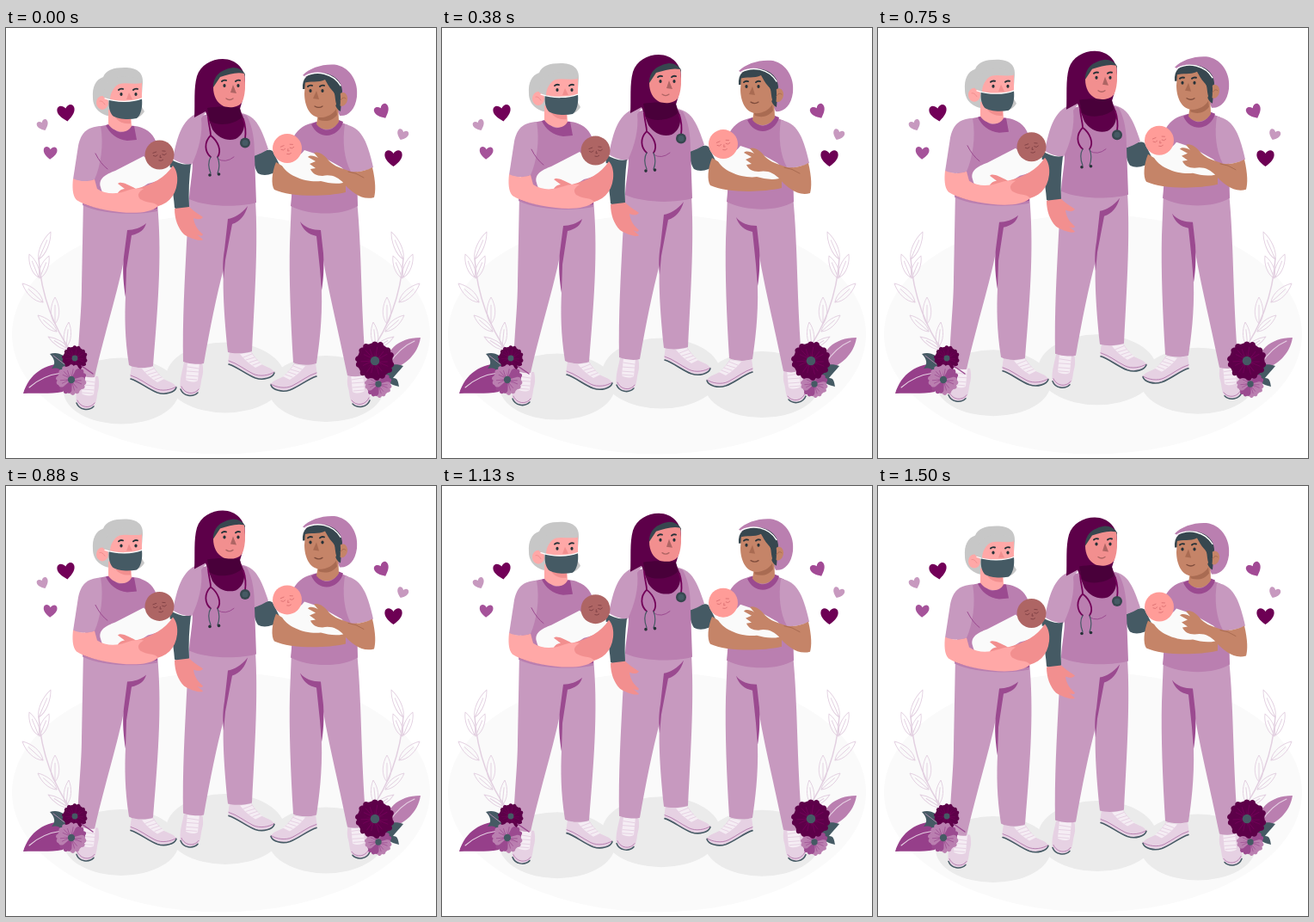
Recreate the animation shown at these times as an HTML page with a canvas. Size 500 by 500 pixels, loop 1.54 s.

```html
<!DOCTYPE html>
<html lang="en">
<head>
<meta charset="utf-8">
<title>Nurses</title>
<style>
html, body { margin: 0; width: 100%; height: 100%; overflow: hidden; background: #fff; }
canvas { display: block; width: 500px; height: 500px; }
</style>
</head>
<body>
<canvas id="stage" width="500" height="500"></canvas>
<script>
const ctx = document.getElementById('stage').getContext('2d');
const LOOP = 1540, STEPS = 37, RISE = 10;
const C = {
  plum: '#5d0049', plumDeep: '#49003a', heart: '#720058', mid: '#9b4a90', shirt: '#ba7fb0', pale: '#c799bf',
  teal: '#455a64', ink: '#37474f', dark: '#263238', skin: '#ffa8a7', blush: '#f28f8f',
  tan: '#c58468', tanDark: '#a96b52', brown: '#ae6564', pink: '#ff9c98', cloth: '#fafafa', hair: '#c7c7c7',
  shoe: '#e6d1e3', lace: '#f5edf4', twig: '#e2cfe0'
};

function fill(color, d) {
  ctx.fillStyle = color;
  ctx.fill(new Path2D(d));
}
function line(color, width, d) {
  ctx.strokeStyle = color;
  ctx.lineWidth = width;
  ctx.stroke(new Path2D(d));
}
function oval(color, x, y, rx, ry = rx, turn = 0) {
  ctx.fillStyle = color;
  ctx.beginPath();
  ctx.ellipse(x, y, rx, ry, turn, 0, Math.PI * 2);
  ctx.fill();
}
function at(x, y, turn, scaleX, scaleY, draw) {
  ctx.save();
  ctx.translate(x, y);
  ctx.rotate(turn);
  ctx.scale(scaleX, scaleY);
  draw();
  ctx.restore();
}

function heart(color, x, y, width, turn) {
  at(x, y, turn, width / 20, width / 20, () =>
    fill(color, 'M0 10C-7 5-11 0-10-5C-9-10-3-10 0-5C3-10 9-10 10-5C11 0 7 5 0 10Z'));
}

function sprigLeaf(x, y, tipX, tipY, width) {
  const len = Math.hypot(tipX - x, tipY - y);
  at(x, y, Math.atan2(tipY - y, tipX - x), 1, 1, () =>
    line(C.twig, .9, `M0 0C${len * .25} ${-width} ${len * .7} ${-width * .8} ${len} 0` +
      `C${len * .7} ${width * .8} ${len * .25} ${width} 0 0L${len * .7} 0`));
}
function sprig() {
  line(C.twig, 1.5, 'M75 375C57 350 41 313 38 268');
  const leaves = [[38, 269, 52, 237, 6], [38, 290, 27, 263, 6], [39, 291, 50, 265, 6], [43, 319, 19, 297, 7],
    [57, 344, 57, 313, 7], [59, 353, 37, 334, 6], [70, 371, 73, 342, 6], [73, 374, 49, 359, 5]];
  for (const leaf of leaves) sprigLeaf(...leaf);
}

function flower(x, y, r, colors, veins) {
  const petals = 7;
  for (let i = 0; i < petals; i++) {
    at(x, y, i * Math.PI * 2 / petals - 1.4, r / 20, r / 20, () => {
      fill(colors[i % colors.length], 'M0 0L9-7C12-10 16-9 17-6C20-5 20-2 18 0C21 2 20 5 17 6C16 9 12 10 9 7Z');
      line(veins, .8, 'M4 0L14 0M5 1L12 4M5-1L12-4');
    });
  }
  oval(C.teal, x, y, r * .23);
}

function sideShoe(x, y, flip = 1) {
  at(x, y, 0, flip, 1, () => {
    fill(C.shoe, 'M1 0C0 7-1 11 0 15L31 31C40 33 51 31 53 25C51 19 43 18 38 15C33 10 29 5 26 0C18 3 8 3 1 0Z');
    fill(C.lace, 'M13 3L26 1C29 6 34 12 39 15L31 19C23 14 18 9 13 3Z');
    line(C.mid, .6, 'M0 11C10 14 18 21 28 26C36 30 47 28 53 24');
    line(C.shoe, 1, 'M17 7L27 3M20 10L30 7M24 13L33 10M28 16L36 13');
    line(C.teal, 1.6, 'M0 15C10 18 20 27 31 31C40 34 51 31 53 25');
  });
}
function frontShoe(x, y, flip = 1) {
  at(x, y, 0, flip, 1, () => {
    fill(C.shoe, 'M4 0C2 10-2 22 0 31C3 39 14 41 20 35C24 29 23 24 25 17C27 10 26 4 25 0Z');
    fill(C.lace, 'M8 0L22 0L20 21C15 24 9 22 6 20Z');
    line(C.mid, .6, 'M1 28C5 37 16 38 21 31');
    line(C.shoe, 1, 'M8 5L21 7M7 10L21 11M7 15L20 16M6 19L19 20');
    line(C.teal, 1.5, 'M0 31C3 39 14 41 20 35');
  });
}

function eyes(left, right, y) {
  for (const x of [left, right]) {
    oval(C.dark, x, y, 1.6, 2);
    line(C.dark, 1.9, `M${x - 3} ${y - 5}Q${x - 1} ${y - 7} ${x + 2} ${y - 6}`);
  }
}
function baby(x, y, skin, features, turn) {
  oval(skin, x, y, 17);
  at(x, y, turn, .8, .8, () =>
    line(features, 1, 'M-9 0Q-6 3-3 0M4 0Q7 3 10 0M-9-4L-4-5M5-5L9-4M1 1L0 4L2 4M-2 8Q1 10 4 8'));
}

function backdrop() {
  ctx.fillStyle = '#fff';
  ctx.fillRect(0, 0, 500, 500);
  oval('#fafafa', 250, 356, 243, 139.5);
  sprig();
  at(500, 0, 0, -1, 1, sprig);
  heart(C.heart, 70, 98.5, 20, -.15);
  heart(C.pale, 43, 113, 13, -.4);
  heart('#a5539a', 51.5, 145, 15.5, .05);
  heart('#a24a95', 437.5, 97, 17, -.45);
  heart(C.pale, 461, 124, 13, .35);
  heart('#6d0054', 450.5, 151, 20, 0);
}

function shadows() {
  oval('#ebebeb', 134, 422, 67, 38.5);
  oval('#ebebeb', 255, 406.5, 69, 41);
  oval('#ebebeb', 372, 419.5, 67, 38.5);
}

function middleNurse() {
  frontShoe(203, 389);
  sideShoe(259, 376);
  fill(C.pale, 'M213 198C235 206 270 206 290 200C293 250 290 300 286 376C278 379 264 379 258 377C253 330 252 300 253 280C245 310 237 350 230 390C222 392 211 390 206 388C205 340 208 290 210 250Z');
  fill(C.mid, 'M281 207C274 216 265 221 258 222L254 258C252 270 252 278 253 292L255 270L263 228C272 225 278 218 281 207Z');
  fill(C.teal, 'M288 149C296 145 304 139 310 143L320 163C310 171 300 173 293 169C289 163 288 156 288 149Z');
  fill(C.pale, 'M274 99C291 102 297 117 305 141C300 144 294 147 288 149Z');
  fill(C.shirt, 'M222 104C235 98 270 97 280 102C287 115 289 130 289 148L291 203C270 209 232 208 213 199C214 180 219 160 216 150Z');
  fill(C.pale, 'M234 96C208 100 201 117 194 152C200 156 208 159 216 159C224 142 229 123 227 105Z');
  fill(C.teal, 'M191 152C198 157 208 160 215 158C213 174 212 190 213 208C207 212 200 212 196 209C195 190 189 170 191 152Z');
  fill(C.blush, 'M196 210L213 208C218 213 225 217 229 220C225 224 222 222 218 221C219 229 223 235 229 240C228 243 224 241 222 240L229 246C226 249 213 244 207 240C200 233 196 222 196 210Z');
  line(C.mid, 1, 'M246 152Q255 158 265 150');
  // scarf and face
  fill(C.plum, 'M219 104C220 88 218 70 222 56C226 43 239 36 252 36C268 36 279 48 278 64C277 76 275 85 272 94L277 107C278 119 274 125 267 129C257 132 247 128 240 118L232 97Z');
  fill(C.plumDeep, 'M234 93C245 91 258 91 272 93L274 104C266 112 247 115 237 108Z');
  fill(C.ink, 'M241 70C240 56 250 48 264 46C270 46 276 49 278 54L275 66Z');
  fill(C.blush, 'M241 69L249 57C259 54 268 51 277 53C279 68 278 80 274 87C269 93 259 93 253 91C245 87 241 79 241 69Z');
  eyes(254, 270, 67);
  fill(C.brown, 'M264 66L261 75L268 76Z');
  line(C.brown, 1.3, 'M256 82Q260 85 264 82');
  // stethoscope
  line(C.heart, 1.8, 'M235 104C236 115 238 119 238 125C230 133 231 144 238 150M238 125C247 132 251 143 246 150M276 106C279 115 279 122 278 129');
  line(C.teal, 1.2, 'M238 150C234 157 236 164 238 169M246 150C249 158 248 164 246 169');
  oval(C.dark, 237, 171, 1.8);
  oval(C.dark, 247.5, 170, 1.8);
  oval(C.ink, 278, 133.5, 6);
  oval(C.teal, 278, 133.5, 3.5);
}

function leftNurse() {
  frontShoe(82, 405);
  sideShoe(145, 393);
  fill(C.pale, 'M90 198L176 204C181 260 178 310 171 393C164 396 150 396 143 392C138 360 138 335 139 312L137 270C130 306 116 350 103 406C96 407 89 405 83 402C84 360 88 330 88 300Z');
  fill(C.mid, 'M163 227C158 232 148 235 141 235L137 266C135 283 137 300 139 313L140 280L146 241C155 239 161 235 163 227Z');
  fill(C.shirt, 'M107 115C116 111 150 112 158 116C169 120 174 128 177 140L176 213C150 218 112 217 89 206L93 170Z');
  fill(C.mid, 'M90 201C120 212 155 213 176 207L176 210C150 216 115 214 89 204Z');
  fill(C.pale, 'M110 114C94 115 87 122 84 137L78 176C85 179 94 179 103 176C110 160 114 136 110 114Z');
  line(C.mid, 1, 'M104 146Q110 158 118 164');
  // head
  fill(C.hair, 'M124 103C111 102 101 94 101 81C100 69 104 60 113 57C116 49 125 46 138 46C151 46 160 51 159 64L157 90L161 97C156 105 150 106 141 105Z');
  fill(C.mid, 'M116 113L122 111C127 123 136 125 145 114L149 114L152 130L141 131C129 130 120 122 116 113Z');
  fill(C.skin, 'M119 95L145 98L146 114C141 124 126 122 119 112Z');
  fill(C.blush, 'M127 104L145 106L145 111C137 112 131 109 127 104Z');
  fill(C.skin, 'M120 82C121 72 126 62 135 61C147 62 155 60 158 63L158 86L121 96Z');
  oval(C.skin, 112, 87, 7, 8);
  line(C.blush, 1, 'M109 85Q112 84 115 89');
  fill(C.hair, 'M113 80C113 67 122 56 138 56C150 57 157 58 158 64C149 66 139 63 132 65C125 68 121 76 121 84Z');
  eyes(134, 151, 77);
  fill(C.blush, 'M143 75L140 83L147 83Z');
  fill(C.teal, 'M120 83C133 87 148 86 158 82C159 92 157 101 152 105C142 107 130 106 124 102C120 97 119 90 120 83Z');
  line('#fff', 1.3, 'M115 82C130 87 147 86 158 82');
  // baby and arms
  fill(C.cloth, 'M110 185C107 175 116 170 127 166L160 149C169 158 183 164 193 162C190 173 178 178 165 181L143 195C132 198 122 198 117 195C112 192 111 189 110 185Z');
  baby(178.5, 147.5, C.brown, '#7b3d42', -.15);
  fill(C.blush, 'M194 160C198 164 200 172 199 180C197 197 187 206 170 209L130 196C128 191 134 187 138 187L130 181C133 178 140 181 151 187C170 182 185 174 194 160Z');
  fill(C.skin, 'M78 175C86 179 95 179 103 176L106 187C116 194 129 193 138 190C146 187 153 186 160 187C154 191 152 194 156 199C164 204 173 202 177 207C169 215 150 216 132 214C111 212 91 206 82 200C77 195 77 184 78 175Z');
}

function rightNurse() {
  frontShoe(423, 402, -1);
  sideShoe(361, 390, -1);
  fill(C.pale, 'M332 200L408 200C414 260 412 315 419 402C412 406 404 406 397 404C386 350 375 306 369 270L367 305C368 340 364 370 361 390C352 393 340 392 334 389C331 340 329 290 330 250Z');
  fill(C.mid, 'M342 225C347 232 357 235 366 235L369 262C370 280 369 293 367 305L365 280L361 242C352 240 345 235 342 225Z');
  fill(C.shirt, 'M354 111C365 107 387 107 398 113L408 165L409 207C390 219 352 218 331 207C335 180 329 150 333 130C337 119 346 113 354 111Z');
  fill(C.mid, 'M355 112L361 109C367 123 382 121 387 107L392 109C388 126 365 133 355 112Z');
  fill(C.pale, 'M394 112C412 116 419 127 427 162C419 166 410 168 401 167C393 152 391 132 394 112Z');
  // head
  fill(C.shirt, 'M345 55C353 46 371 41 385 43C401 47 410 63 408 80C406 95 398 103 388 102L374 69Z');
  fill(C.tan, 'M364 93L386 87L387 109C382 118 369 122 361 112Z');
  fill(C.tanDark, 'M363 104C371 105 380 101 384 94L385 101C379 109 371 109 364 107Z');
  fill(C.ink, 'M345 71C344 58 351 52 363 52C378 52 390 59 391 73L389 97C382 94 380 81 379 70Z');
  oval(C.tan, 391, 83, 6, 8, .2);
  fill(C.tan, 'M348 62C356 61 366 58 373 55C376 68 382 75 385 83C384 96 374 104 364 104C353 103 347 90 347 76Z');
  fill(C.ink, 'M346 64C350 54 365 51 377 55C388 61 391 74 388 95C383 91 383 82 382 75C376 70 374 65 371 60C363 64 354 61 346 64Z');
  line('#fff', 1.4, 'M348 56C361 49 380 52 389 67');
  line(C.tanDark, 1, 'M389 84Q392 79 395 82');
  eyes(354, 368, 73);
  fill(C.tanDark, 'M361 73L357 82L364 83Z');
  line('#7f4d3c', 1.3, 'M359 91Q364 94 368 91');
  // arms and baby
  fill(C.tan, 'M314 156C309 168 308 182 312 188C329 196 369 197 395 191L395 178L347 176Z');
  fill(C.cloth, 'M320 158C330 156 341 150 347 142L365 148L390 162C397 168 397 177 392 180C382 182 374 180 366 178C349 180 326 172 320 158Z');
  baby(327, 140, C.pink, '#d96d70', -.2);
  fill(C.tan, 'M401 167C410 168 419 166 426 162C430 179 430 190 428 197C414 201 402 191 393 181C386 173 378 170 368 172C361 172 356 169 354 164L360 163L353 158L360 155L351 150C354 147 359 149 363 151L358 145C363 143 370 147 376 155C382 161 390 163 401 167Z');
  line(C.tanDark, 1, 'M398 167Q407 168 416 174');
}

function bouquets() {
  fill('#963f8a', 'M20 425C27 402 45 390 69 390L66 423C50 426 36 424 20 425Z');
  line(C.shoe, 1.1, 'M27 418C38 408 50 403 65 401');
  fill(C.teal, 'M51 379C60 376 69 380 73 389L66 401C63 395 57 395 53 396C58 391 57 385 51 379Z');
  line(C.pale, .8, 'M55 381L68 391');
  flower(80, 384, 15, [C.plum], C.heart);
  flower(76, 409, 18, [C.shirt, C.mid, C.shirt], C.mid);
  line(C.mid, 1.5, 'M88 393L101 402');

  fill(C.shirt, 'M443 398C438 376 456 360 482 360C479 379 464 394 443 398Z');
  line(C.shoe, 1.1, 'M445 391C453 379 463 369 475 364');
  fill(C.teal, 'M437 401C444 390 453 390 462 393C457 399 453 403 450 407C456 407 456 412 457 417C447 415 440 410 437 401Z');
  flower(433, 414, 16, [C.shirt, C.mid, C.shirt], C.mid);
  flower(429, 387, 23, [C.plum], C.heart);
}

function lift(time) {
  const step = Math.floor((time % LOOP) / (LOOP / STEPS) + .1);
  const phase = ((step + 1) % STEPS) / STEPS;
  return RISE * (1 - Math.abs(2 * phase - 1));
}

function render(time) {
  backdrop();
  ctx.save();
  ctx.translate(0, .5 - lift(time));
  shadows();
  middleNurse();
  leftNurse();
  rightNurse();
  ctx.restore();
  bouquets();
}

const start = performance.now();
function tick() {
  render(performance.now() - start);
  requestAnimationFrame(tick);
}
ctx.lineCap = ctx.lineJoin = 'round';
tick();
</script>
</body>
</html>
```
